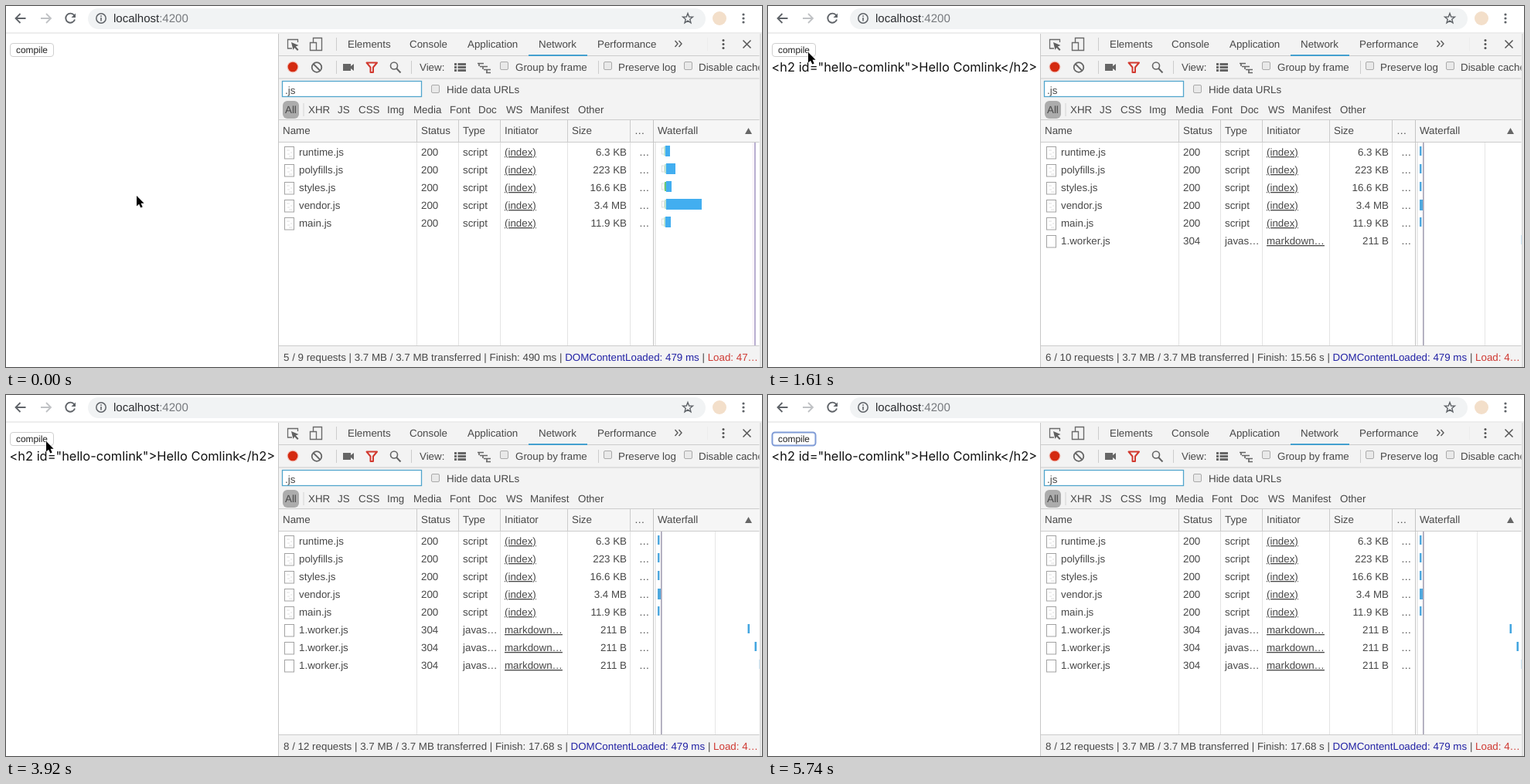
An HTML page for the animation above (5810 ms loop, 978 by 468 pixels).

```html
<!DOCTYPE html>
<html lang="en">
<head>
<meta charset="utf-8">
<title>Network panel</title>
<style>
html, body { margin: 0; width: 100%; height: 100%; overflow: hidden; background: #fff; }
svg { display: block; width: 978px; height: 468px; }
text { font: 13.35px "Liberation Sans", Arial, sans-serif; fill: #484848; white-space: pre; text-rendering: geometricPrecision; }
</style>
</head>
<body>
<svg id="stage" viewBox="0 0 978 468" xmlns="http://www.w3.org/2000/svg">
  <defs>
    <linearGradient id="pressed" x2="0" y2="1"><stop stop-color="#70a0f4"/><stop offset="1" stop-color="#3b70ea"/></linearGradient>
    <clipPath id="panel"><path d="M353 36H974.5V468H353Z"/></clipPath>
  </defs>
</svg>
<script>
const NS = "http://www.w3.org/2000/svg";
const stage = document.getElementById("stage");
const LOOP = 5810, STEP = 70;

function add(parent, tag, attrs, content) {
  const el = document.createElementNS(NS, tag);
  for (const k in attrs) el.setAttribute(k, attrs[k]);
  if (content !== undefined) el.textContent = content;
  parent.appendChild(el);
  return el;
}
const group = (parent = stage, attrs = {}) => add(parent, "g", attrs);
const rect = (p, x, y, width, height, fill, more) => add(p, "rect", { x, y, width, height, fill, ...more });
const label = (p, x, y, s, more) => add(p, "text", { x, y, ...more }, s);
const circle = (p, cx, cy, r, fill, more) => add(p, "circle", { cx, cy, r, fill, ...more });
const line = (p, d, stroke, width = 1, more) =>
  add(p, "path", { d, stroke, "stroke-width": width, fill: "none", ...more });
const dots = (p, x, y, r, fill) => [-5, 0, 5].forEach(d => circle(p, x, y + d, r, fill));

function browserBar() {
  const g = group(), ink = "#5f6368";
  rect(g, 106, 3, 799, 27, "#f1f3f4", { rx: 13.5 });
  line(g, "M25.5 16H13M18.5 10L12.5 16L18.5 22", ink, 1.8);
  line(g, "M45 16H57.500M52 10L58 16L52 22", "#c0c2c5", 1.8);
  line(g, "M88.200 12.200A6 6 0 1 0 89 17.500", ink, 1.9);
  add(g, "path", { d: "M90 9.500V15H84.500Z", fill: ink });
  circle(g, 123, 16, 6.2, "none", { stroke: ink, "stroke-width": 1.5 });
  rect(g, 122.2, 15, 1.6, 4.5, ink);
  rect(g, 122.2, 12.3, 1.6, 1.6, ink);
  const url = label(g, 139, 21, "", { style: "font-size:15px" });
  add(url, "tspan", { fill: "#2b2d30" }, "localhost");
  add(url, "tspan", { fill: "#75787c" }, ":4200");
  let star = "";
  for (let i = 0; i < 10; i++) {
    const r = i % 2 ? 2.9 : 6.8, a = Math.PI * (i / 5 - 0.5);
    star += (i ? "L" : "M") + (882 + r * Math.cos(a)).toFixed(2) + " " + (16.3 + r * Math.sin(a)).toFixed(2);
  }
  line(g, star + "Z", ink, 1.4);
  circle(g, 923, 16, 9, "#f3dfca");
  dots(g, 954, 16, 1.6, ink);
  rect(g, 0, 34.5, 978, 1, "#dcdcdc");
}

function tabs(g) {
  line(g, "M370 55H364.500V43.500H377.500V47", "#6a6a6a", 1.3);
  add(g, "path", { d: "M369 47L378.500 51L374.800 52.500L378.500 56.500L377 58L373.200 54L371.500 57Z", fill: "#606060" });
  line(g, "M397.500 47V41.500H408.500V57.500H402M393.500 47.500H401.500V57.500H393.500Z", "#6a6a6a", 1.4);
  rect(g, 427, 41, 1, 17, "#ccc");
  [[442, "Elements"], [522, "Console"], [597, "Application"], [689, "Network"], [765, "Performance"]]
    .forEach(([x, s]) => label(g, x, 54, s, s === "Network" ? { fill: "#303030" } : {}));
  line(g, "M865.500 45L869 49L865.500 53M870.500 45L874 49L870.500 53", "#5a5a5a", 1.4);
  dots(g, 928, 49.5, 1.5, "#555");
  rect(g, 907, 41, 1, 17, "#ececec");
  line(g, "M953.500 44.500L963.500 54.500M963.500 44.500L953.500 54.500", "#555", 1.5);
  rect(g, 353, 64, 625, 1, "#ccc");
  rect(g, 676, 63, 76, 2, "#43a0cf");
}

const checkbox = (g, x, y) => rect(g, x + .5, y + .5, 10, 10, "#e9e9e9", { stroke: "#aaa", rx: 1.5 });

function tools(g) {
  circle(g, 371, 79, 7.5, "#f2c0b8");
  circle(g, 371, 79, 6.3, "#d42a10");
  circle(g, 402, 79.5, 6.3, "none", { stroke: "#666", "stroke-width": 1.8 });
  line(g, "M397.500 75L406.500 84", "#666", 1.8);
  [427, 524, 766].forEach(x => rect(g, x, 71, 1, 17, "#ccc"));
  add(g, "path", { d: "M436 75H446V78L450 75V84L446 81V84H436Z", fill: "#666" });
  line(g, "M466.500 73.500H480L475 79.500V86H471.500V79.500Z", "#d23a30", 2, { "stroke-linejoin": "round" });
  circle(g, 502, 77.5, 4.5, "none", { stroke: "#666", "stroke-width": 1.6 });
  line(g, "M505.300 81L510.500 86.500", "#666", 2);
  label(g, 535, 84, "View:");
  [74, 78, 82].forEach(y => {
    rect(g, 580, y, 3, 3, "#666");
    rect(g, 584.500, y, 10.5, 3, "#666");
  });
  line(g, "M610 74.500H618M613 78.500H623M618 82.500H627M612 75V78M617 79V82M622 83V87M621 86.500H627", "#666", 1.6);
  checkbox(g, 639, 72);
  label(g, 659, 84, "Group by frame");
  checkbox(g, 773, 72);
  label(g, 792, 84, "Preserve log");
  checkbox(g, 877, 72);
  label(g, 896, 84, "Disable cache");
  rect(g, 353, 93.500, 625, 1, "#ccc");
}

function filters(g) {
  rect(g, 357.5, 97.5, 180, 20, "#fff", { stroke: "#51a5cc", "stroke-width": 1.3 });
  label(g, 361, 114, ".js");
  checkbox(g, 550, 102);
  label(g, 570, 113, "Hide data URLs");
  rect(g, 358, 123, 21, 23, "#acacac", { rx: 6 });
  label(g, 361, 139, "All", { fill: "#fff" });
  rect(g, 384.500, 126, 1, 17, "#d4d4d4");
  [[391, "XHR"], [429, "JS"], [456, "CSS"], [493, "Img"], [527, "Media"], [574, "Font"],
   [611, "Doc"], [647, "WS"], [678, "Manifest"], [740, "Other"]].forEach(([x, s]) => label(g, x, 139, s));
}

function table(g) {
  rect(g, 353, 148, 625, 292, "#fff");
  rect(g, 353, 148, 625, 28, "#f6f6f6");
  rect(g, 353, 147, 625, 1, "#ccc");
  rect(g, 353, 176, 625, 1, "#ccc");
  [[358, "Name"], [537, "Status"], [591, "Type"], [645, "Initiator"], [732, "Size"], [813, "…"], [843, "Waterfall"]]
    .forEach(([x, s]) => label(g, x, 166, s));
  add(g, "path", { d: "M956 166H965L960.500 158Z", fill: "#666" });
  [531, 585, 639, 726, 807, 837].forEach(x => {
    rect(g, x, 148, 1, 29, "#ccc");
    rect(g, x, 177, 1, 263, "#e4e4e4");
  });
  rect(g, 837, 148, 1, 292, "#c4c4c4");
  rect(g, 839.500, 177, 1, 263, "#dadada");
}

const rowY = i => 189 + i * 23;

function fileRow(g, i, [name, size, cached]) {
  const y = rowY(i) + 5;
  rect(g, 360.5, y - 11.5, 12, 15.5, "#fff", { stroke: "#a2a2a2" });
  if (!cached) line(g, `M363 ${y - 7}h4m1 3h2m-6 2h3m-1 3h4`, "#dedede");
  label(g, 379, y, name);
  label(g, 537, y, cached ? "304" : "200");
  label(g, 591, y, cached ? "javas…" : "script");
  label(g, 645, y, cached ? "markdown…" : "(index)", { "text-decoration": "underline" });
  label(g, 803, y, size, { "text-anchor": "end" });
  label(g, 819, y, "…");
}

const files = [["runtime.js", "6.3 KB"], ["polyfills.js", "223 KB"], ["styles.js", "16.6 KB"],
  ["vendor.js", "3.4 MB"], ["main.js", "11.9 KB"]];
const worker = ["1.worker.js", "211 B", true];

// one entry per number of finished clicks
const phases = [
  { finish: "490 ms", load: "47…" },
  { finish: "15.56 s", load: "4…", grid: 927, jobs: [975] },
  { finish: "16.76 s", load: "4…", grid: 921, jobs: [966, 975] },
  { finish: "17.68 s", load: "4…", grid: 917, jobs: [960, 969, 975] }
];

function phaseView(parent, { finish, load, grid, jobs = [] }) {
  const g = group(parent), n = jobs.length, blue = "#42aef0";
  if (!n) {
    [[853, 6], [854, 12], [854, 7], [854, 46], [853, 7]].forEach(([x, w], i) => {
      const y = rowY(i) - 8;
      rect(g, 848.5, y + 3, 3, 8, "#fff", { stroke: "#d0d8d4", "stroke-width": .8 });
      rect(g, x - 2, y + 1, 2, 12, i === 2 ? "#68c878" : "#bfe5d0");
      rect(g, x, y, w, 14, blue);
    });
    rect(g, 966, 177, 1, 263, "#f6e8f3");
    rect(g, 968, 177, 1.8, 263, "#b1a5cb");
  } else {
    rect(g, grid, 177, 1, 263, "#e6e6e6");
    rect(g, 847, 177, 1.700, 263, "#a9a5b8");
    files.forEach((f, i) => rect(g, 843, rowY(i) - 7, i === 3 ? 4 : 2.5, i === 3 ? 14 : 12, "#4fa8de"));
    jobs.forEach((x, i) => {
      fileRow(g, 5 + i, worker);
      rect(g, x - .5, rowY(5 + i) - 7, 2.5, 12, "#42a5e0");
    });
  }
  const t = label(g, 359, 460, "");
  add(t, "tspan", {}, `${5 + n} / ${9 + n} requests | 3.7 MB / 3.7 MB transferred | Finish: ${finish} | `);
  add(t, "tspan", { fill: "#2323a5" }, "DOMContentLoaded: 479 ms");
  add(t, "tspan", {}, " | ");
  add(t, "tspan", { fill: "#cf3a33" }, "Load: " + load);
  return g;
}

browserBar();
rect(stage, 352, 36, 626, 432, "#f3f3f3");
const panel = group(stage, { "clip-path": "url(#panel)" });
[tabs, tools, filters, table].forEach(draw => draw(panel));
files.forEach((f, i) => fileRow(panel, i, f));
rect(panel, 353, 440, 625, 1, "#ccc");
const views = phases.map(p => phaseView(panel, p));
rect(stage, 352, 36, 1, 432, "#c8c8c8");
rect(stage, 975.5, 36, 1, 432, "#c9c9c9");

const button = rect(stage, 5.5, 48.5, 56, 17, "#fff", { rx: 3.5, stroke: "#cfcfcf" });
label(stage, 13, 61, "compile", { style: "font-size:11.9px;fill:#222" });
const output = label(stage, 4.5, 85, '<h2 id="hello-comlink">Hello Comlink</h2>',
  { style: "font-family:Inter,'Liberation Sans',sans-serif;font-size:16.4px;fill:#111" });
const ring = circle(stage, 51.5, 60.5, 21.3, "none", { stroke: "#111", "stroke-width": 1.5 });
const cursor = add(stage, "path", {
  d: "M0 0V13.500L3.100 10.700L5.300 15.500L7.700 14.400L5.500 9.800H9.600Z",
  fill: "#000", stroke: "#fff", "stroke-width": 1, "paint-order": "stroke"
});

const path = [[0, 169, 246], [350, 139, 209], [560, 139, 209], [1050, 52, 60],
  [4760, 52, 60], [5390, 986, 150]];
const presses = [[1260, 1470], [2520, 2730], [3500, 3640]];
const FOCUS = 5600;

function cursorAt(t) {
  let i = 1;
  while (i < path.length - 1 && t > path[i][0]) i++;
  const [t0, x0, y0] = path[i - 1], [t1, x1, y1] = path[i];
  const k = Math.min(1, (t - t0) / (t1 - t0)), e = k * k * (3 - 2 * k);
  return [x0 + (x1 - x0) * e, y0 + (y1 - y0) * e];
}

const show = (el, on) => el.setAttribute("visibility", on ? "visible" : "hidden");

function render(t) {
  const done = presses.filter(p => t >= p[1]).length;
  const down = presses.some(([a, b]) => t >= a && t < b);
  const focus = t >= FOCUS;
  views.forEach((v, i) => show(v, i === done));
  show(output, done > 0);
  show(ring, down);
  button.setAttribute("fill", down ? "url(#pressed)" : "#fff");
  button.setAttribute("stroke", down ? "#4f83e6" : focus ? "#7f9bd6" : "#cfcfcf");
  button.setAttribute("stroke-width", focus ? 2 : 1);
  cursor.setAttribute("transform", `translate(${cursorAt(t).map(v => v.toFixed(1))})`);
}

const start = performance.now();
function tick() {
  const t = (performance.now() - start) % LOOP;
  render(Math.floor(t / STEP) * STEP);
  requestAnimationFrame(tick);
}
tick();
</script>
</body>
</html>
```
